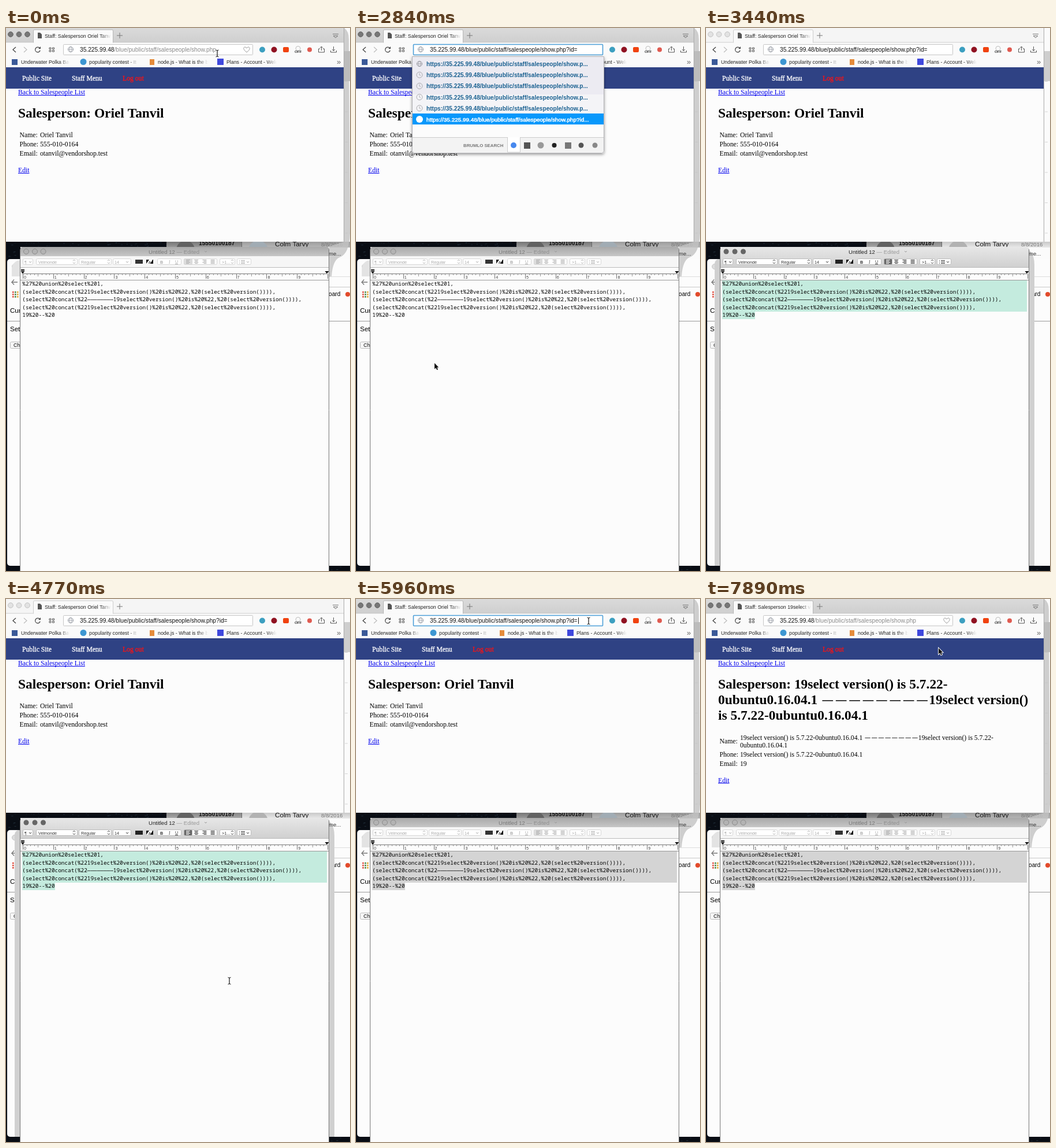
Recreate the animation shown at these times as an HTML page with a canvas. Size 596x940 px, loop 8000 ms.

```html
<!DOCTYPE html>
<html lang="en">
<head>
<meta charset="utf-8">
<title>Query string demo</title>
<style>
html, body { margin: 0; width: 596px; height: 940px; overflow: hidden; background: #fff }
canvas { display: block }
</style>
</head>
<body>
<canvas id="stage" width="596" height="940"></canvas>
<script>
const c = document.getElementById('stage').getContext('2d');
const LOOP = 8000, STEP = 148;
const SANS = '"Liberation Sans", Arial, sans-serif';
const SERIF = '"Liberation Serif", Times, serif';
const MONO = '"Noto Sans Mono", monospace';
const PERSON = 'Oriel Tanvil';
const URL_BASE = '35.225.99.48', URL_PATH = '/blue/public/staff/salespeople/show.php';
const SUB = '19select%20version()%20is%20%22,%20(select%20version()))),';
const QUERY = [
  '%27%20union%20select%201,',
  '(select%20concat(%22' + SUB,
  '(select%20concat(%22' + '—'.repeat(8) + SUB,
  '(select%20concat(%22' + SUB,
  '19%20--%20'
];
const VERSION = '19select version() is 5.7.22-', BUILD = '0ubuntu0.16.04.1';

// Pointer path: time, x, y
const PATH = [
  [0, 366, 44], [148, 366, 44], [592, 398, 40], [1036, 408, 46], [1184, 408, 46],
  [1480, 386, 36], [1924, 386, 36], [2812, 136, 580], [2960, 136, 560], [3996, 250, 570],
  [4736, 387, 661], [5032, 440, 330], [5180, 440, 330], [5624, 403, 38], [7252, 403, 38],
  [7844, 403, 85], [8000, 403, 85]
];

function rect(x, y, w, h, fill) { c.fillStyle = fill; c.fillRect(x, y, w, h); }

function box(x, y, w, h, r, fill, stroke, lw = 1) {
  c.beginPath(); c.roundRect(x, y, w, h, r);
  if (fill) { c.fillStyle = fill; c.fill(); }
  if (stroke) { c.strokeStyle = stroke; c.lineWidth = lw; c.stroke(); }
}

function dot(x, y, r, fill, stroke, lw = 1) {
  c.beginPath(); c.arc(x, y, r, 0, 7);
  if (fill) { c.fillStyle = fill; c.fill(); }
  if (stroke) { c.strokeStyle = stroke; c.lineWidth = lw; c.stroke(); }
}

function line(points, stroke, lw = 1, close) {
  c.beginPath();
  for (let i = 0; i < points.length; i += 2) c.lineTo(points[i], points[i + 1]);
  if (close) c.closePath();
  c.strokeStyle = stroke; c.lineWidth = lw; c.stroke();
}

function poly(points, fill) {
  c.beginPath();
  for (let i = 0; i < points.length; i += 2) c.lineTo(points[i], points[i + 1]);
  c.fillStyle = fill; c.fill();
}

function text(s, x, y, size, color = '#000', family = SANS, weight = '') {
  c.font = `${weight} ${size}px ${family}`;
  c.fillStyle = color;
  c.fillText(s, x, y);
  return x + c.measureText(s).width;
}

function vertical(y0, y1, a, b) {
  const g = c.createLinearGradient(0, y0, 0, y1);
  g.addColorStop(0, a); g.addColorStop(1, b);
  return g;
}

// Text that fades out towards its right limit
function fading(s, x, y, size, end) {
  const g = c.createLinearGradient(end - 18, 0, end, 0);
  g.addColorStop(0, '#222'); g.addColorStop(1, '#2220');
  text(s, x, y, size, g);
}

function link(s, x, y) {
  const end = text(s, x, y, 11.7, '#00e', SERIF);
  rect(x, y + 1, end - x, 1, '#00e');
}

function dashes(x, y, em, lw) {
  c.setLineDash([em * .8, em * .2]);
  line([x + em * .1, y, x + em * 7.95, y], '#000', lw);
  c.setLineDash([]);
  return x + em * 8;
}

function globe(x, y, color) {
  dot(x, y, 4.5, null, color, .9);
  line([x - 4.5, y, x + 4.5, y], color, .7);
  c.beginPath(); c.ellipse(x, y, 2, 4.5, 0, 0, 7); c.stroke();
}

function chevrons(x, y, color) {
  line([x - 2, y - 1.3, x, y - 3.3, x + 2, y - 1.3], color);
  line([x - 2, y + 1.3, x, y + 3.3, x + 2, y + 1.3], color);
}

function chevron(x, y, color) { line([x - 2, y - 1, x, y + 1, x + 2, y - 1], color); }

function drawDesktop(front) {
  rect(0, 0, 596, 940, '#fff');
  rect(0, 370, 596, 570, '#090d14');
  let seed = 7;
  const rnd = () => (seed = seed * 16807 % 2147483647) / 2147483647;
  for (let i = 0; i < 170; i++)
    rect(rnd() * 278, 370 + rnd() * 30, 1 + rnd() * 3, 1, `rgba(70,95,115,${rnd() * .5})`);
  for (let i = 0; i < 60; i++)
    rect(rnd() * 596, 931 + rnd() * 9, 1 + rnd() * 3, 1, `rgba(70,95,115,${rnd() * .5})`);

  // Message list peeking out behind
  rect(586, 0, 10, 370, '#fbfbfb');
  for (let y = 92.5; y < 370; y += 52.5) line([587, y, 592, y], '#d5d5d5');
  rect(586, 40, 10, 52, front ? '#cecece' : '#c4c4c4');
  rect(278, 370, 131, 30, vertical(370, 379, front ? '#858585' : '#767676', front ? '#a5a5a5' : '#969696'));
  rect(409, 370, 187, 30, vertical(370, 382, front ? '#c9c9c9' : '#9c9c9c', front ? '#eee' : '#bcbcbc'));
  rect(560, 380, 36, 20, '#fbfbfb');
  rect(408, 370, 1, 10, '#666');
  dot(311, 384, 16, '#626262');
  dot(437, 385, 17, front ? '#b2b2b2' : '#a1acb4');
  text('15550100187', 334, 376, 10.2, '#111', SANS, 'bold');
  text('Colm Tarvy', 466, 377.5, 11.7, '#111');
  text('8/8/2016', 546, 378, 9.6, '#777');

  // Rear browser window
  box(2, 400, 600, 531, [5, 0, 0, 5], '#fcfcfc');
  line([560, 430.5, 596, 430.5], '#ddd');
  line([560, 448.5, 596, 448.5], '#c8c8c8');
  dot(15, 413, 4.5, '#ddd', '#c6c6c6');
  line([20, 440, 10, 440, 14, 435.5], '#777', 1.3);
  line([10, 440, 14, 444.5], '#777', 1.3);
  for (let i = 0; i < 9; i++)
    rect(11 + i % 3 * 4, 456 + (i / 3 | 0) * 4, 2.6, 2.6, ['#df4b3c', '#4a8b4c', '#e0a832'][i % 3]);
  text('Current', 7, 493, 11.5);
  rect(2, 507, 594, 1, '#999');
  text('Set', 7, 525, 11.5);
  box(7.5, 543.5, 30, 11, 2, '#f7f7f7', '#bbb');
  text('Cha', 13, 552, 8.6);
  text('oard', 559, 464, 10.2);
  dot(592, 461, 4, '#e24a2b');
}

function drawShadow(front) {
  if (front) {
    box(15, 400, 10, 531, [8, 0, 0, 0], '#d0d0d0');
    c.beginPath();
    c.moveTo(545, 379); c.quadraticCurveTo(569, 381, 569, 410);
    c.lineTo(569, 931); c.lineTo(555, 931); c.lineTo(555, 379);
    c.fillStyle = '#d0d0d0'; c.fill();
  } else {
    c.beginPath();
    c.moveTo(586, 0); c.quadraticCurveTo(594, 5, 594, 20);
    c.lineTo(596, 355); c.quadraticCurveTo(595, 391, 578, 397);
    c.quadraticCurveTo(566, 402, 564, 430);
    c.lineTo(558, 430); c.lineTo(558, 379); c.lineTo(586, 370);
    c.fillStyle = 'rgba(195,195,195,.8)'; c.fill();
    rect(586, 40, 9, 52, '#bcbcbc');
    box(10, 402, 15, 28, [15, 0, 0, 0], '#e3e3e3');
  }
  text('me...', 559, 394, 9.6, '#333');
}

function drawToolbar(front) {
  const ink = front ? '#333' : '#aaa', edge = front ? '#bbb' : '#d6d6d6';
  const pill = (x, w) => box(x + .5, 399.5, w, 10, 2, '#fff', edge);
  [[29, 17], [52, 71], [126, 56], [185, 31], [262, 41], [308, 57], [370, 26], [400, 24]].forEach(p => pill(...p));
  text('¶', 32, 407.5, 7.5, ink); chevron(42, 405, ink);
  text('Velmonde', 56, 407.5, 7.2, ink); chevrons(118, 404.5, ink);
  text('Regular', 130, 407.5, 7.2, ink); chevrons(178, 404.5, ink);
  text('14', 188, 407.5, 7.2, ink); chevron(210, 405, ink);
  rect(224, 401, 13, 7, front ? '#222' : '#333');
  rect(243, 401, 12, 7, '#111');
  poly([243, 408, 250, 408, 254, 401, 248, 401], '#fff');
  text('a', 247, 407.5, 7, '#111');
  text('B', 267, 407.5, 7.2, ink, SANS, 'bold');
  text('I', 282, 407.5, 7.2, ink, SERIF, 'italic');
  text('U', 293, 407, 7.2, ink); rect(293, 408, 5, 1, ink);
  box(308.5, 399.5, 14, 10, 2, front ? '#666' : '#ddd', edge);
  for (let i = 0; i < 4; i++) for (let j = 0; j < 4; j++) {
    const short = j % 2 && i < 3 ? 2 : 0;
    rect(312 + i * 14.2 + (i == 1 ? short / 2 : i == 2 ? short : 0), 401 + j * 2, 7 - short, 1,
      front && !i ? '#fff' : ink);
  }
  text('>1...', 374, 407.5, 7.2, ink); chevrons(392, 404.5, ink);
  for (let j = 0; j < 3; j++) { rect(404, 402 + j * 2.5, 1, 1, ink); rect(407, 402 + j * 2.5, 7, 1, ink); }
  chevron(419, 405, ink);
}

function drawDocument(front, selected) {
  rect(25, 379, 535, 561, '#fcfcfc');
  box(25, 379, 535, 35, [4, 4, 0, 0], front ? vertical(379, 414, '#e7e7e7', '#d0d0d0') : '#f6f6f6');
  if (!front) box(25, 379, 535, 16, [4, 4, 0, 0], vertical(379, 395, '#a9a9a9', '#c6c6c6'));
  for (const x of [35, 50, 64.5]) dot(x, 387, 4.5, front ? '#666' : '#b3b3b3', front ? null : '#8b8b8b');
  const end = text('Untitled 12', 247, 391, 9.6, front ? '#222' : '#777');
  text(' — Edited', end, 391, 9.6, front ? '#999' : '#8d8d8d');
  chevron(346, 387, '#999');
  drawToolbar(front);

  rect(25, 414, 535, 1, '#bbb');
  rect(28, 425, 529, 1, '#777');
  for (let i = 0; i <= 80; i++) {
    const big = i % 8 == 0;
    rect(Math.round(29 + i * 6.6), 426, 1, big ? 8 : i % 4 ? 2 : 4, big ? '#777' : '#999');
    if (big && i < 80) text(i / 8, 31 + i * 6.6, 434, 7.2, '#444');
  }
  rect(25, 436, 535, 1, '#999');
  rect(26, 418, 6, 2, '#000');
  poly([25.5, 421, 32.5, 421, 29, 425], '#000');
  poly([552.5, 421, 559.5, 421, 556, 425], '#000');

  if (selected) {
    const tint = front ? '#c4ebde' : '#d4d4d4';
    rect(28, 437, 528, 54, tint);
    rect(28, 491, 57, 13, tint);
  }
  QUERY.forEach((s, i) => text(s, 28.3, 446 + i * 13.55, 9.4, '#000', MONO));
  for (const x of [24.5, 559.5]) line([x, 383, x, 940], '#777');
}

function drawPage(loaded) {
  rect(0, 68, 585, 302, '#fcfcfc');
  rect(0, 68, 585, 37, '#2f4284');
  c.lineWidth = .3;
  [['Public Site', 28, '#fff'], ['Staff Menu', 114, '#fff'], ['Log out', 202, '#f11']].forEach(([s, x, color]) => {
    text(s, x, 91, 11.7, color, SERIF);
    c.strokeStyle = color; c.strokeText(s, x, 91);
  });
  link('Back to Salespeople List', 21, 115);
  const h1 = (s, x, y) => text(s, x, y, 23.4, '#000', SERIF, 'bold');
  const cell = (s, x, y) => text(s, x, y, 11.7, '#000', SERIF);
  if (loaded) {
    h1('Salesperson: ' + VERSION, 21, 155);
    h1(VERSION.slice(0, 18), dashes(h1(BUILD + ' ', 21, 182), 176, 23.4, 1.4), 182);
    h1('is 5.7.22-' + BUILD, 21, 209);
    cell('Name:', 23.5, 250);
    cell(VERSION, dashes(cell(VERSION + BUILD + ' ', 59, 244), 240.5, 11.7, .8), 244);
    cell(BUILD, 59, 257);
    cell('Phone:', 23.5, 273); cell(VERSION + BUILD, 59, 273);
    cell('Email:', 23.5, 289); cell('19', 59, 289);
    link('Edit', 21, 317.5);
  } else {
    h1('Salesperson: ' + PERSON, 21, 155);
    cell('Name:', 23.5, 189); cell(PERSON, 59, 189);
    cell('Phone:', 23.5, 205); cell('555-010-0164', 59, 205);
    cell('Email:', 23.5, 221); cell('otanvil@vendorshop.test', 59, 221);
    link('Edit', 21, 250);
  }
}

function drawAddress(t, focus) {
  box(99.5, 28.5, 328, 18, 1, '#fff', focus ? '#4d9fd8' : '#c6c6c6', focus ? 1.6 : 1);
  globe(112, 37, '#8a8f98');
  const put = (s, x, color) => text(s, x, 41, 10.2, color);
  if (t < 450 || t >= 7290) {
    put(URL_PATH, put(URL_BASE, 128, '#111'), '#8a8a8a');
  } else if (t >= 6400) {
    c.save();
    c.beginPath(); c.rect(128, 29, 282, 17); c.clip();
    c.textAlign = 'right';
    put(QUERY.join(''), 406, '#111');
    c.restore();
  } else {
    put(URL_BASE + URL_PATH + '?id=' + (t < 1960 ? '8' : ''), 128, '#111');
  }
  if (t >= 5500 && t < 6400) rect(385, 32, 1, 11, '#111');
  // The bookmark heart goes away while the address is being edited
  if (t < 1960 || t >= 7290) {
    c.beginPath(); c.moveTo(417, 42);
    c.bezierCurveTo(407, 35, 414, 30, 417, 35);
    c.bezierCurveTo(420, 30, 427, 35, 417, 42);
    c.strokeStyle = '#999'; c.lineWidth = 1; c.stroke();
  }
}

function drawBrowser(t, front, focus, loaded) {
  rect(0, 0, 585, 25, front ? vertical(0, 25, '#dadada', '#cfcfcf') : '#f5f5f5');
  box(47.5, 3, 138, 24, [2, 2, 0, 0], '#fafafa', front ? '#b5b5b5' : '#ccc');
  rect(0, 24.5, 47, 1, '#c2c2c2');
  rect(186, 24.5, 399, 1, '#c2c2c2');
  rect(0, 25.5, 585, 42.5, '#fafafa');
  for (const x of [8, 22.5, 37]) dot(x, 11, 4.4, front ? '#777' : '#e2e2e2', front ? '#666' : '#c4c4c4');
  poly([55, 8, 59, 8, 62, 11, 62, 18, 55, 18], '#555');
  fading('Staff: Salesperson ' + (loaded ? '19select version' : PERSON), 67, 16.5, 8.8, 182);
  line([192, 13, 202, 13], '#777'); line([197, 8, 197, 18], '#777');
  rect(566, 10, 10, 1, '#777');
  line([567, 13.5, 575, 13.5, 571, 17], '#777', 1, true);

  line([17, 33, 12, 37.5, 17, 42], '#444', 1.3);
  line([31, 33, 36, 37.5, 31, 42], '#bbb', 1.2);
  c.beginPath(); c.arc(55, 37.5, 4.3, .3, 5.5);
  c.strokeStyle = '#444'; c.lineWidth = 1.3; c.stroke();
  poly([56, 36, 60, 36, 60, 32], '#444');
  for (let i = 0; i < 4; i++) box(75 + i % 2 * 5.5, 34 + (i >> 1) * 4.5, 3, 2.5, 0, null, '#555');
  drawAddress(t, focus);

  dot(444, 37.5, 5, '#3c9fc0');
  dot(464.5, 37.5, 5, '#901222');
  box(480, 33, 10, 9, 2, '#f0420f');
  dot(506, 35.5, 4, null, '#bbb');
  text('OFF', 500, 42.5, 6.2, '#333', SANS, 'bold');
  dot(526, 37.5, 4, '#df5a50');
  line([544, 36, 541.5, 36, 541.5, 42, 551.5, 42, 551.5, 36, 549, 36], '#555');
  line([546.5, 39, 546.5, 32], '#555'); line([544, 34.5, 546.5, 32, 549, 34.5], '#555');
  line([567.5, 32, 567.5, 39], '#555'); line([565, 37, 567.5, 39.5, 570, 37], '#555');
  line([562.5, 39, 562.5, 42, 572.5, 42, 572.5, 39], '#555');

  rect(10, 54, 10, 10, '#3b5998');
  fading('Underwater Polka Bands', 26, 62, 8.8, 110);
  dot(134, 58.5, 5.5, '#3d96d2');
  fading('popularity contest - It', 144, 62, 8.8, 229);
  rect(249, 54, 8, 10, '#e58b3a');
  fading('node.js - What is the best', 263, 62, 8.8, 350);
  rect(366, 53, 11, 11, '#3f48dd');
  fading('Plans - Account - Welcome', 382, 62, 8.8, 469);
  text('»', 573, 63, 13, '#666');
  drawPage(loaded);
  rect(585, 0, 1, 370, '#aaa');
}

function drawSuggestions() {
  c.save();
  c.shadowColor = '#0006'; c.shadowBlur = 5; c.shadowOffsetY = 2;
  box(97, 49, 333, 168, [0, 0, 4, 4], '#fcfcfc');
  c.restore();
  rect(97, 49, 333, 66, '#ecebf2');
  rect(97, 115, 333, 33, '#f4f4f7');
  rect(97, 148, 333, 19, '#0898fb');
  const full = 'https://' + URL_BASE + URL_PATH;
  for (let i = 0; i < 5; i++) {
    const y = 62 + i * 19.2;
    text(full.slice(0, -2) + '...', 122, y + 4, 10.15, '#1b6191', SANS, 'bold');
    if (i) {
      dot(110, y, 5, null, '#a9a9ad');
      line([110, y - 3, 110, y, 112, y + 1.5], '#a9a9ad');
    } else globe(110, y, '#8c8c92');
  }
  dot(110, 158, 6, '#fff');
  text(full + '?id...', 122, 161.5, 9.95, '#fff');
  c.strokeStyle = '#fff'; c.lineWidth = .5; c.strokeText(full + '?id...', 122, 161.5);
  box(97, 189, 333, 28, [0, 0, 4, 4], '#f3f3f3');
  rect(97, 189, 333, 1, '#ccc');
  rect(262, 189, 23, 26, '#fff');
  line([262.5, 189, 262.5, 215, 284.5, 215, 284.5, 189], '#ccc');
  text('BRUMLO SEARCH', 186, 206, 7.8, '#777', SANS, 'bold');
  dot(273, 203, 5, '#4788ee');
  rect(291, 198, 11, 11, '#555');
  dot(320, 203, 5.5, '#999');
  dot(343.5, 203, 4, '#222');
  rect(362, 198, 11, 11, '#777');
  dot(390, 203, 4.5, '#555');
  dot(414, 203, 4.5, '#888');
  box(97.5, 49.5, 332, 167, [0, 0, 4, 4], null, '#b4b4b8');
}

function pointerAt(t) {
  const q = Math.floor(t / STEP) * STEP;
  const i = PATH.findIndex(p => p[0] > q);
  const [t0, x0, y0] = PATH[i - 1], [t1, x1, y1] = PATH[i];
  let k = (q - t0) / (t1 - t0);
  k = k * k * (3 - 2 * k);
  return [x0 + (x1 - x0) * k, y0 + (y1 - y0) * k];
}

function drawPointer(t, docFront) {
  if (t >= 3140 && t < 4030 || t >= 6400 && t < 7290) return;
  const [x, y] = pointerAt(t);
  c.save();
  c.translate(x, y);
  if (y < 48 || docFront && y > 436) {
    line([0, -5, 0, 5], '#111', 1.2);
    for (const s of [-1, 1]) line([-2.5, s * 6, 0, s * 5, 2.5, s * 6], '#111');
  } else {
    const arrow = [0, 0, 0, 10.5, 2.4, 8.3, 4.2, 12, 6, 11.2, 4.4, 7.6, 7.3, 7.4];
    line(arrow, '#fff', 1.8, true);
    poly(arrow, '#111');
  }
  c.restore();
}

function frame(now) {
  const t = now % LOOP;
  const docFront = t >= 2990 && t < 5500;
  const focus = t >= 450 && t < 7290 && !docFront;
  drawDesktop(docFront);
  drawShadow(docFront);
  drawDocument(docFront, t >= 3290);
  drawBrowser(t, !docFront, focus, t >= 7290);
  if (t >= 2100 && t < 2990 || t >= 6400 && t < 7000) drawSuggestions();
  drawPointer(t, docFront);
}

const start = performance.now();
function tick() {
  frame(performance.now() - start);
  requestAnimationFrame(tick);
}
tick();
</script>
</body>
</html>
```
